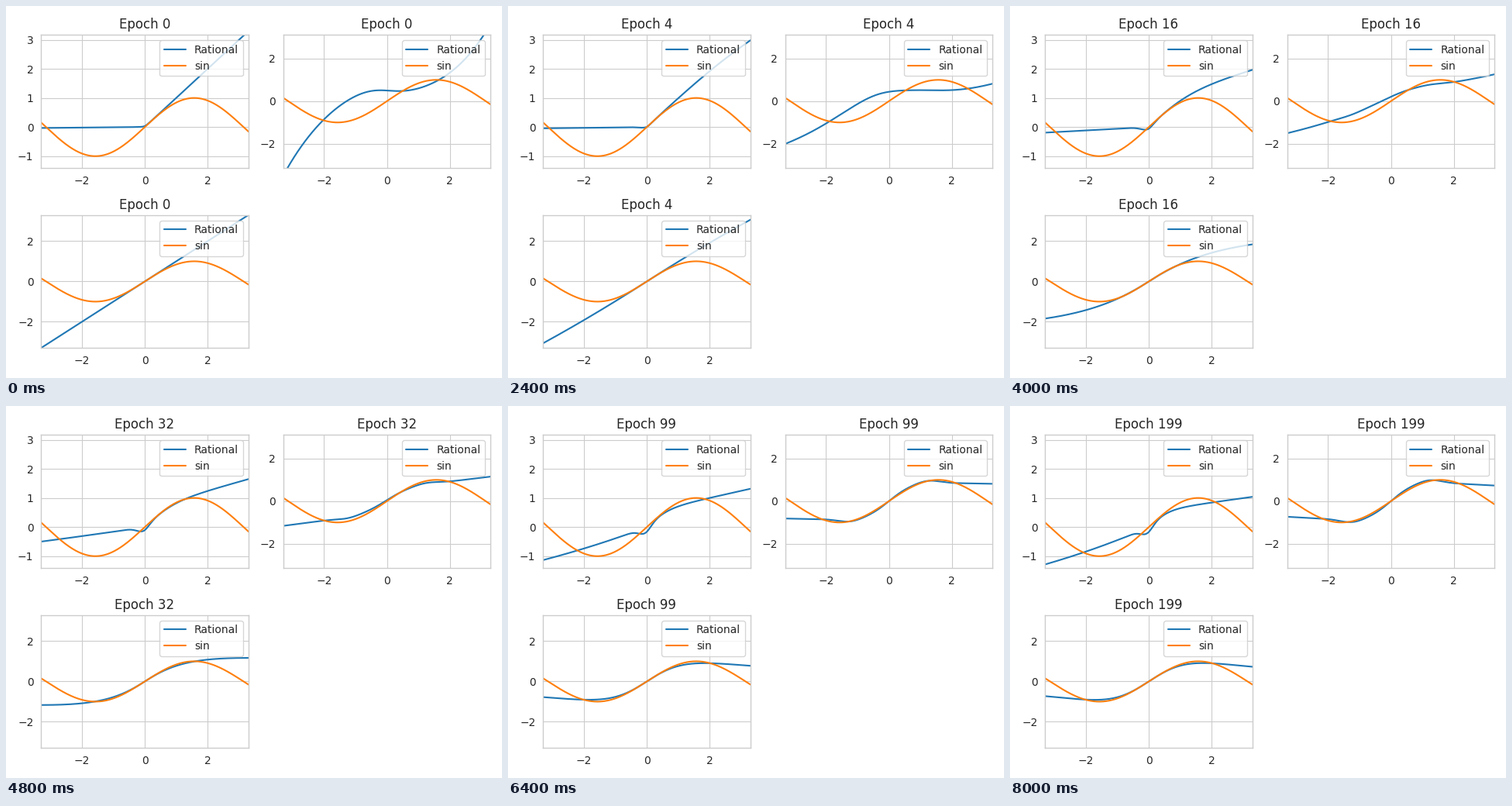
Animation, 640 px wide and 480 px high, one loop 8800 ms. Source, as a matplotlib script:

```python
import numpy as np
import matplotlib.pyplot as plt
from matplotlib.animation import FuncAnimation

INK, GREY = "0.15", "0.8"
plt.rcParams.update({
    "font.family": "DejaVu Sans",
    "text.color": INK, "xtick.color": INK, "ytick.color": INK,
    "axes.edgecolor": GREY, "axes.linewidth": 1, "axes.axisbelow": True,
    "axes.grid": True, "grid.color": GREY,
    "xtick.major.size": 0, "ytick.major.size": 0,
    "xtick.major.pad": 7, "ytick.major.pad": 7,
    "lines.solid_capstyle": "round",
})

EPOCHS = [0, 1, 2, 4, 8, 16, 32, 64, 99, 128, 199]
X = np.linspace(-3.3, 3.3, 400)


def rise(n, half, power):
    """Slow start, then saturation at 1; reaches 0.5 at epoch `half`."""
    return n**power / (n**power + half**power)


def fade(n, tau):
    return np.exp(-n / tau)


def bell(x, mid, width):
    return np.exp(-((x - mid) / width)**2)


def leaky(n):
    """Leaky ReLU whose right arm bends over while the left arm tilts down."""
    pos = (X + np.sqrt(X**2 + 0.005)) / 2
    neg = X - pos
    slope = 0.33 - 0.0009 * n
    knee = 0.6 + (13 / (n + 0.1))**1.2
    right = slope * pos + (1 - slope) * knee * np.tanh(pos / knee)
    tilt = 0.01 + 0.5 * rise(n, 48, 2)
    left = tilt * neg / (1 - 0.15 * tilt * neg)
    dip = 0.2 * (1 - fade(n, 25))
    return left + right - dip * bell(X, -0.07, 0.27)


def cubic(n):
    """Cubic that flattens at once, then loses its even part and turns odd."""
    done = rise(n, 30, 1.6)
    slope = 0.62 * (1 - done) - 0.11
    step = 1.05 * done - 0.45 * fade(n, 6)
    crest = bell(X, 1.25, 0.5) - bell(X, -1.25, 0.5)
    odd = (slope * X + step * np.tanh(X / 0.75)
           + 0.16 * done * crest + 0.065 * fade(n, 0.5) * X**3)
    mid = 0.5 * np.exp(-(n / 17.5)**1.4)
    sag = 0.45 * n * fade(n, 4)
    width = np.sqrt(3 + 2.5 * fade(n, 4))
    return odd + (mid + sag) * bell(X, 0, width) - sag


def identity(n):
    """Straight line that is damped more and more away from zero."""
    power = 1.05 + 1.1 * (1 - fade(n, 55))
    return X / (1 + 3.65 * rise(n, 32, 1.85) * np.abs(X / 3.3)**power)


PANELS = [
    (leaky, (-1.4, 3.165), range(-1, 4)),
    (cubic, (-3.13, 3.11), (-2, 0, 2)),
    (identity, (-3.3, 3.29), (-2, 0, 2)),
]

fig = plt.figure(figsize=(6.4, 4.8), dpi=100)
plots = []
for k, (curve, ylim, yticks) in enumerate(PANELS):
    ax = fig.add_subplot(2, 2, k + 1)
    line, = ax.plot(X, curve(0), color="#1f77b4", lw=1.5, label="Rational")
    ax.plot(X, np.sin(X), color="#ff7f0e", lw=1.5, label="sin")
    ax.set(xlim=(-3.3, 3.29), ylim=ylim, xticks=(-2, 0, 2),
           yticks=yticks, title="Epoch 0")
    ax.legend(loc="upper right")
    plots.append((ax, line, curve))
fig.tight_layout()


def update(i):
    n = EPOCHS[i]
    for ax, line, curve in plots:
        line.set_ydata(curve(n))
        ax.set_title(f"Epoch {n}")
    return [line for _, line, _ in plots]


anim = FuncAnimation(fig, update, frames=len(EPOCHS), interval=800, repeat=True)
plt.show()
```
